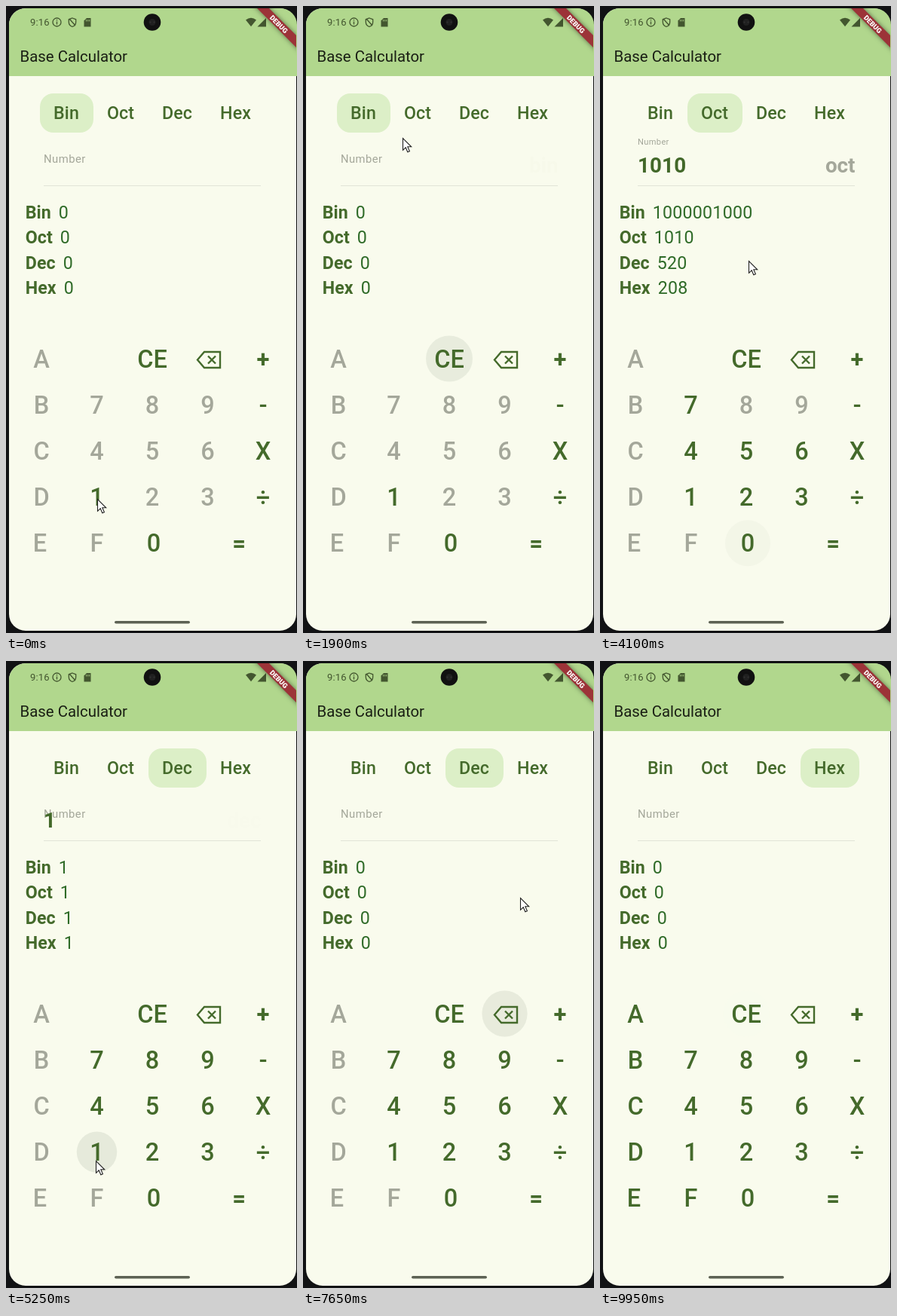
These frames come from a looping animation (386 px wide and 832 px high, 10000 ms). An HTML page with a canvas:

```html
<!DOCTYPE html>
<html lang="en">
<head>
<meta charset="utf-8">
<title>Base Calculator</title>
<style>
html, body { margin: 0; width: 100%; height: 100%; overflow: hidden; background: #111214; }
canvas { display: block; }
</style>
</head>
<body>
<canvas id="stage" width="386" height="832"></canvas>
<script>
const ctx = document.getElementById('stage').getContext('2d');
const LOOP = 10000, HOLD = 110, TAP_DELAY = 100;
const PAPER = '#f9fbed', GREEN = '#446a2b', GREY = '#a4a79a', INK = '#43562f';

const tabs = [
  { name: 'Bin', base: 2, x: 80, left: 45, right: 116, valueX: 69.8 },
  { name: 'Oct', base: 8, x: 152, left: 116, right: 189, valueX: 71.8 },
  { name: 'Dec', base: 10, x: 227, left: 189, right: 266, valueX: 75.8 },
  { name: 'Hex', base: 16, x: 304.5, left: 266, right: 344, valueX: 76.8 }
];

const keys = {};
['A,,CE,<,+', 'B,7,8,9,-', 'C,4,5,6,X', 'D,1,2,3,÷', 'E,F,0,,'].forEach((row, r) =>
  row.split(',').forEach((name, c) => {
    if (name) keys[name] = { x: 47 + c * 73.5, y: 468 + r * 61.2 };
  }));
keys.E.x = 45;
keys['0'].x = 196;
keys['='] = { x: 309, y: 712.8 };

// Pointer stops: time, what is tapped there ('' for none), optional pointer position
const stops = [
  [0, '1', 121, 654], [220, '0'], [430, '1'], [640, '0'], [1150, '', 197, 706],
  [1650, 'CE'], [1900, '', 132, 175], [2080, 'Oct'],
  [2720, '1'], [3080, '0'], [3370, '1'], [3650, '0'], [4090, '', 197, 338],
  [4350, 'CE'], [4720, 'Dec'],
  [5050, '', 119, 682], [5140, '1', 119, 663], [5470, '0'], [5780, '1'],
  [6330, '9'], [6690, '', 274, 328],
  [6980, '<'], [7110, '<'], [7240, '<'], [7370, '<'], [7820, 'Hex'],
  [8500, 'A', 57, 483], [8700, 'B'], [8880, 'C'], [9070, 'D', 50, 678],
  [9390, 'CE'], [9900, '', 200, 52]
].map(([time, name, x, y]) => {
  const tab = tabs.find(t => t.name === name);
  const spot = keys[name];
  if (x === undefined) {
    x = tab ? tab.x + 2 : spot.x + 2;
    y = tab ? 152 : spot.y + (name === '0' ? -7 : 10);
  }
  return { time, name, tab, x, y };
});

const clamp = v => Math.max(0, Math.min(1, v));
const ease = v => { v = clamp(v); return v * v * (3 - 2 * v); };
const mix = (a, b, p) => a + (b - a) * p;

function text(str, x, y, size, weight, color, align = 'left', spacing = 0) {
  ctx.font = `${weight} ${size}px Roboto, sans-serif`;
  ctx.letterSpacing = spacing + 'px';
  ctx.textAlign = align;
  ctx.fillStyle = color;
  ctx.fillText(str, x, y + size * 0.355);
}

function box(x, y, w, h, r, color) {
  ctx.fillStyle = color;
  ctx.beginPath();
  ctx.roundRect(x, y, w, h, r);
  ctx.fill();
}

function disc(x, y, rx, ry, color) {
  ctx.fillStyle = color;
  ctx.beginPath();
  ctx.ellipse(x, y, rx, ry, 0, 0, 7);
  ctx.fill();
}

function shape(d, fill, stroke, width = 1) {
  const path = new Path2D(d);
  if (fill) { ctx.fillStyle = fill; ctx.fill(path); }
  if (stroke) { ctx.strokeStyle = stroke; ctx.lineWidth = width; ctx.stroke(path); }
}

function withAlpha(alpha, draw) {
  ctx.save();
  ctx.globalAlpha *= alpha;
  draw();
  ctx.restore();
}

function stateAt(now) {
  const s = { number: '', tab: tabs[0], oldTab: tabs[0], tabTime: -1e4, fillTime: -1e4 };
  for (const { time, name, tab } of stops) {
    const at = time + TAP_DELAY;
    if (at > now || !name) continue;
    const wasFilled = s.number !== '';
    if (tab) Object.assign(s, { oldTab: s.tab, tab, tabTime: at });
    else if (name === 'CE') s.number = '';
    else if (name === '<') s.number = s.number.slice(0, -1);
    else s.number += name;
    if (wasFilled !== (s.number !== '')) s.fillTime = at;
  }
  return s;
}

function drawStatusBar() {
  box(4, 3, 382, 90, [22, 22, 0, 0], '#b1d78d');
  text('9:16', 32, 21.5, 13, 400, INK, 'left', 0.2);
  shape('M73 21.5a5.5 5.5 0 1 1-11 0a5.5 5.5 0 1 1 11 0M67.5 20.5v4M67.5 18v1.3', null, INK, 1.3);
  shape('M88 16l4.7 1.8v3.5c0 3-2 5.2-4.7 6.2c-2.7-1-4.7-3.2-4.7-6.2v-3.5zM84 17l8 9', null, INK, 1.3);
  shape('M107 16h5.5v11.5h-9v-8z', INK);
  shape('M106.5 18v2.5M108.6 18v2.5M110.7 18v2.5', null, '#b1d78d', 0.8);
  shape('M318 18.5q7-5.5 14 0l-7 8.7z', INK);
  shape('M345 16v11.5h-11.5z', INK);
  disc(194, 21.5, 11.3, 11.3, '#111');
  disc(194, 21.5, 4.5, 4.5, '#202020');
  disc(191.5, 21.5, 1, 1, '#333');
  disc(196.5, 21.5, 1, 1, '#333');
  text('Base Calculator', 18.5, 66.5, 20.4, 400, '#1a1f14');
}

function drawBanner() {
  ctx.save();
  ctx.beginPath();
  ctx.roundRect(4, 3, 381, 826, 22);
  ctx.clip();
  ctx.translate(362, 24);
  ctx.rotate(Math.PI / 4);
  ctx.shadowColor = 'rgba(0,0,0,.5)';
  ctx.shadowBlur = 6;
  ctx.fillStyle = '#9c3338';
  ctx.fillRect(-50, -5.6, 100, 11.2);
  ctx.shadowColor = 'transparent';
  text('DEBUG', 0, 0.2, 9.2, 900, '#fff', 'center');
  ctx.restore();
}

function drawTabs(s, now) {
  const p = ease((now - s.tabTime) / 200);
  const pill = (tab, alpha) => withAlpha(alpha, () =>
    box(tab.left, 116, tab.right - tab.left, 52, 18, '#dcefc7'));
  if (p < 1) pill(s.oldTab, 1 - p);
  pill(s.tab, p);
  for (const tab of tabs) text(tab.name, tab.x, 141.5, 23.2, 500, GREEN, 'center', 0.1);
}

function drawField(s, now) {
  const p = ease((now - s.fillTime) / 167);
  const lift = s.number ? p : 1 - p;
  text('Number', 50, mix(203, 180.5, lift), mix(14.85, 11.1, lift), 400, GREY, 'left', mix(0.46, 0.35, lift));
  text(s.number, 50, 211, 27.8, 700, '#426829', 'left', 0.1);
  withAlpha(lift, () => text(s.tab.name.toLowerCase(), 338.5, 211, 27.8, 700, GREY, 'right'));
  ctx.fillStyle = '#e1e4d7';
  ctx.fillRect(50, 238, 288, 1);
}

function drawResults(s) {
  const value = parseInt(s.number || '0', s.tab.base);
  tabs.forEach((tab, i) => {
    const y = 273.7 + i * 33.4;
    text(tab.name, 25.8, y, 23.2, 700, GREEN);
    text(value.toString(tab.base).toUpperCase(), tab.valueX, y, 23.2, 400, '#2f6b28', 'left', 0.23);
  });
}

function drawRipples(now) {
  for (const { time, name, tab } of stops) {
    const age = now - time;
    if (!name || tab || /[A-D]$/.test(name) || age <= 0 || age > 575) continue;
    const { x, y } = keys[name];
    const grow = mix(0.35, 1, ease(age / 150));
    const alpha = clamp(age / 75) * clamp((575 - age) / 375);
    withAlpha(alpha, () =>
      disc(x, y, (name === 'CE' ? 31 : 30) * grow, 30.5 * grow, '#e6eadb'));
  }
}

function drawKeys(s, now) {
  const p = clamp((now - s.tabTime) / 200);
  for (const [name, { x, y }] of Object.entries(keys)) {
    if (name === '<') {
      shape('M254 469.5L263 459H284V480H263ZM268 464.5l10 10M278 464.5l-10 10', null, GREEN, 2.4);
      continue;
    }
    const weight = '+='.includes(name) ? 700 : 500;
    const size = weight === 700 ? 31 : 32.5;
    const isDigit = /^[0-9A-F]$/.test(name);
    const enabled = tab => !isDigit || parseInt(name, 16) < tab.base ? 1 : 0;
    const on = mix(enabled(s.oldTab), enabled(s.tab), p);
    if (on < 1) text(name, x, y, size, weight, GREY, 'center');
    if (on > 0) withAlpha(on, () => text(name, x, y, size, weight, GREEN, 'center'));
  }
}

function drawPointer(now) {
  if (now >= 9930) return;
  let i = stops.length - 1;
  while (stops[i].time > now) i--;
  const from = stops[i], to = stops[i + 1] || from;
  const hold = from.name ? HOLD : 20;
  const p = ease((now - from.time - hold) / Math.max(1, to.time - from.time - hold));
  ctx.save();
  ctx.translate(Math.round(mix(from.x, to.x, p)), Math.round(mix(from.y, to.y, p)));
  shape('M.5 .5V16.3L4.2 12.8L6.8 18.7L9.4 17.6L6.8 11.8H11.7Z', '#fff', '#222', 1.1);
  ctx.restore();
}

function draw(now) {
  const s = stateAt(now);
  ctx.fillStyle = '#111214';
  ctx.fillRect(0, 0, 386, 832);
  box(4, 3, 381, 826, 22, PAPER);
  drawStatusBar();
  drawTabs(s, now);
  drawField(s, now);
  drawResults(s);
  drawRipples(now);
  drawKeys(s, now);
  box(144, 816, 100, 3.6, 1.8, '#5d6254');
  drawBanner();
  drawPointer(now);
}

const start = performance.now();
function tick() {
  draw((performance.now() - start) % LOOP);
  requestAnimationFrame(tick);
}
tick();
</script>
</body>
</html>
```
